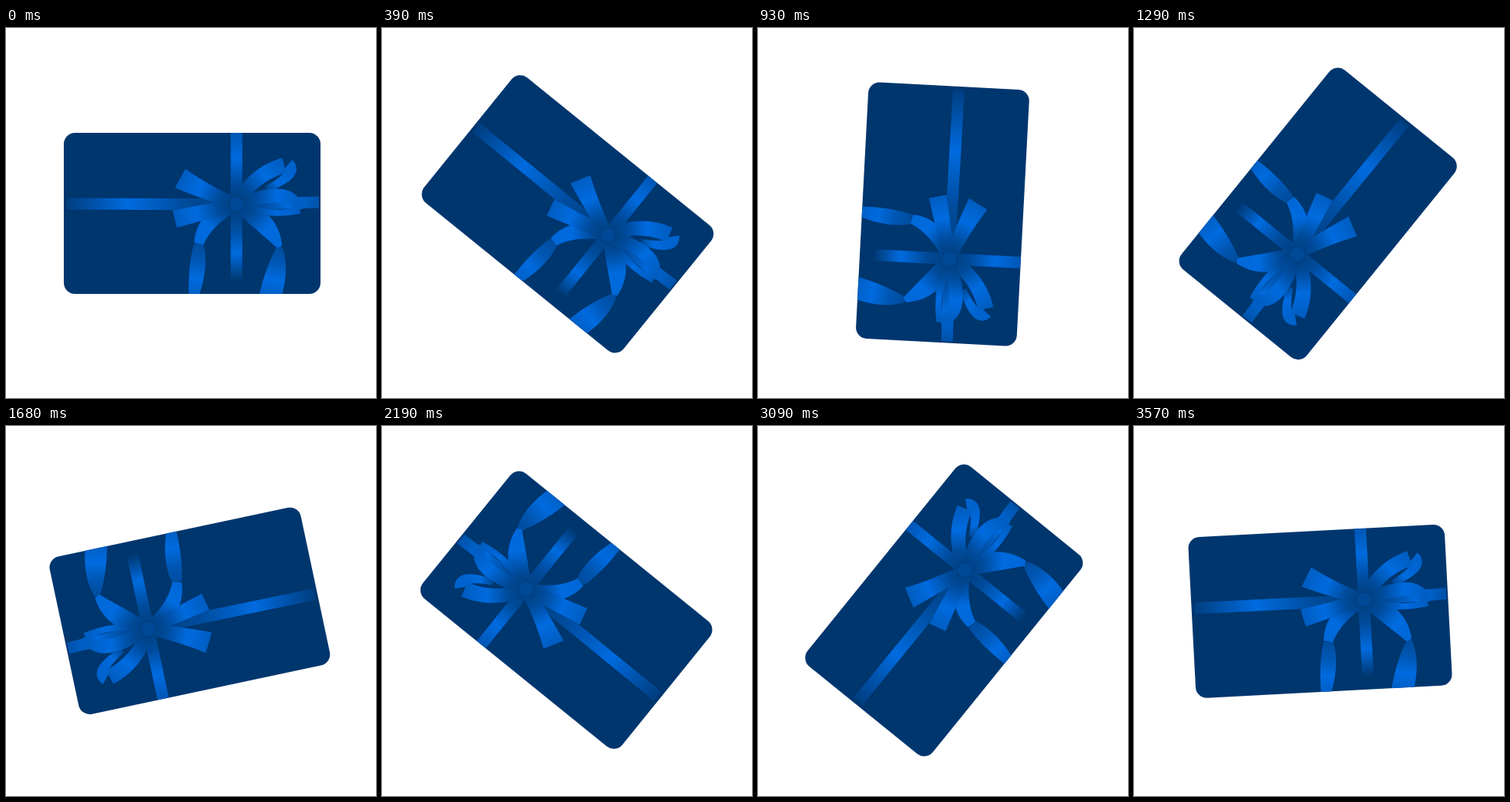
An HTML page with a canvas for the animation above (3.6 s loop, 480x480 px).

```html
<!DOCTYPE html>
<html lang="en">
<head>
<meta charset="utf-8">
<title>Spinning gift card</title>
<style>
  html, body { margin: 0; width: 100%; height: 100%; overflow: hidden; background: #fff; }
  canvas { display: block; width: 480px; height: 480px; }
</style>
</head>
<body>
<canvas id="stage" width="480" height="480"></canvas>
<script>
const ctx = document.getElementById('stage').getContext('2d');
const SIZE = 480, LOOP = 3600, STEP = 30;
const DARK = [0, 54, 110], BRIGHT = [0, 109, 228];
const KNOT = [299, 229, 15]; // x, y and ribbon width

const lerp = (a, b, t) => a + (b - a) * t;
const mix = (p, q, t) => p.map((v, i) => lerp(v, q[i], t));
const tone = k => `rgb(${mix(DARK, BRIGHT, k).map(Math.round)})`;

const card = new Path2D();
card.roundRect(75, 136, 333, 209, 14.5);

// Outline of a quadratic curve whose width bends along with its position.
function bandPath(a, b, c) {
  const left = [], right = [];
  for (let i = 0; i <= 32; i++) {
    const t = i / 32, p = mix(a, b, t), q = mix(b, c, t);
    const [x, y, w] = mix(p, q, t);
    const angle = Math.atan2(q[1] - p[1], q[0] - p[0]);
    const dx = -Math.sin(angle) * w / 2, dy = Math.cos(angle) * w / 2;
    left.push([x + dx, y + dy]);
    right.unshift([x - dx, y - dy]);
  }
  const path = new Path2D();
  [...left, ...right].forEach(([x, y]) => path.lineTo(x, y));
  return path;
}

// Satin starts at the root shade, shines past the middle and dims at the tip.
function band(a, b, c, { root = 0.12, tip = 0.7 } = {}) {
  const fill = ctx.createLinearGradient(a[0], a[1], c[0], c[1]);
  fill.addColorStop(0, tone(root));
  fill.addColorStop(0.3, tone(lerp(root, 1, 0.3)));
  fill.addColorStop(0.64, tone(0.96));
  fill.addColorStop(1, tone(tip));
  return { path: bandPath(a, b, c), fill };
}

function ribbon(x, y, tip) {
  const end = [x, y, KNOT[2]];
  return band(KNOT, mix(KNOT, end, 0.5), end, { tip });
}

const loop = (bend, end) => band(KNOT, bend, end);

const tail = (bend, twist, belly, end) => [
  band(twist, belly, end, { root: 0.4 }),
  band(KNOT, bend, twist, { tip: 0.9 })
];

const bow = [
  ribbon(79, 228, 0.15),
  ribbon(406, 226, 0.5),
  ribbon(299, 136, 0.6),
  ribbon(299, 328, 0),
  ...tail([258, 245, 26], [250, 280, 12], [250, 308, 28], [243, 350, 12]),
  ...tail([338, 248, 38], [355, 284, 7], [353, 312, 32], [342, 350, 28]),
  loop([255, 211, 20], [226, 195, 28]),
  loop([252, 240, 20], [219, 248, 23]),
  band([366, 177, 16], [380, 189, 14], [338, 209, 8], { root: 0.8, tip: 0.3 }),
  loop([320, 190, 20], [361, 178, 20]),
  loop([345, 246, 4], [381, 236, 10]),
  loop([372, 203, 22], [379, 236, 12])
];

const knot = new Path2D();
knot.roundRect(KNOT[0] - 8, KNOT[1] - 9, 16, 17, 6);
bow.push({ path: knot, fill: tone(0.35) });

function render(time) {
  const frame = Math.floor((time % LOOP + 1) / STEP);
  ctx.fillStyle = '#fff';
  ctx.fillRect(0, 0, SIZE, SIZE);
  ctx.save();
  ctx.translate(SIZE / 2, SIZE / 2);
  ctx.rotate(frame * STEP / LOOP * Math.PI * 2);
  ctx.translate(-SIZE / 2, -SIZE / 2);
  ctx.fillStyle = tone(0);
  ctx.fill(card);
  ctx.clip(card);
  for (const { path, fill } of bow) {
    ctx.fillStyle = fill;
    ctx.fill(path);
  }
  ctx.restore();
}

const start = performance.now();
function tick() {
  render(performance.now() - start);
  requestAnimationFrame(tick);
}
tick();
</script>
</body>
</html>
```
